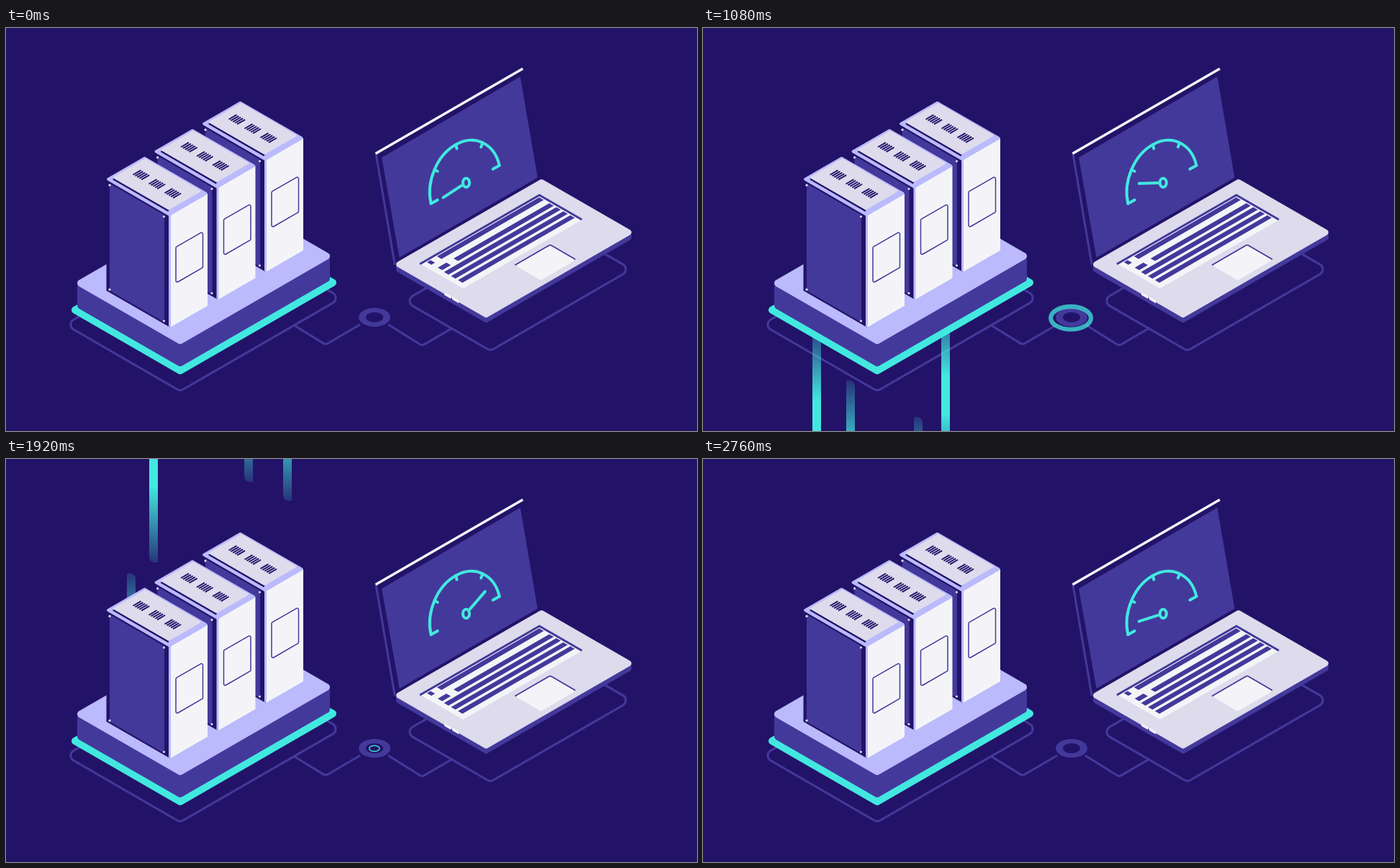
These frames come from a looping animation (960 by 560 pixels, 2.88 s). An HTML page with a canvas:

```html
<!DOCTYPE html>
<html lang="en">
<head>
<meta charset="utf-8">
<title>Server to laptop</title>
<style>
  html, body { margin: 0; width: 100%; height: 100%; overflow: hidden; background: #231368; }
  canvas { display: block; }
</style>
</head>
<body>
<canvas id="stage" width="960" height="560"></canvas>
<script>
const ctx = document.getElementById('stage').getContext('2d');
const LOOP = 2880, STEP = 120;
const ISO = Math.tan(Math.PI / 6);
const NAVY = '#231368', PURPLE = '#43399b', LAVENDER = '#babafc',
      GREY = '#dedbec', WHITE = '#f4f4f8', TEAL = '#42e8e0';

function fill(color) {
  ctx.fillStyle = color;
  ctx.fill();
}

function stroke(color, width, cap = 'butt') {
  ctx.strokeStyle = color;
  ctx.lineWidth = width;
  ctx.lineCap = cap;
  ctx.stroke();
}

// Closed path through [x, y] points with rounded corners.
function trace(points, r = 0) {
  const last = points[points.length - 1];
  ctx.beginPath();
  ctx.moveTo((points[0][0] + last[0]) / 2, (points[0][1] + last[1]) / 2);
  points.forEach((p, i) => ctx.arcTo(...p, ...points[(i + 1) % points.length], r));
  ctx.closePath();
}

function traceLine(points, r = 0) {
  ctx.beginPath();
  ctx.moveTo(...points[0]);
  for (let i = 1; i < points.length - 1; i++) ctx.arcTo(...points[i], ...points[i + 1], r);
  ctx.lineTo(...points[points.length - 1]);
}

function traceOval(x, y, rx, ry) {
  ctx.beginPath();
  ctx.ellipse(x, y, rx, ry, 0, 0, 2 * Math.PI);
}

// Isometric floor tile: its bottom corner and its reach to the left and right.
function traceTile(x, y, left, right, r = 0) {
  trace([[x, y], [x - left, y - left * ISO],
         [x + right - left, y - (left + right) * ISO],
         [x + right, y - right * ISO]], r);
}

function tile(color, ...shape) {
  traceTile(...shape);
  fill(color);
}

// Isometric upright face, going up and away from its near top corner.
function traceWall(x, y, dx, height, r = 0) {
  const far = y - Math.abs(dx) * ISO;
  trace([[x, y], [x + dx, far], [x + dx, far + height], [x, y + height]], r);
}

function wall(color, ...shape) {
  traceWall(...shape);
  fill(color);
}

function slab(top, side, x, y, left, right, height, r) {
  const l = left - r, m = right - r;
  trace([[x - l, y - left * ISO], [x - l, y + height - l * ISO], [x, y + height],
         [x + m, y + height - m * ISO], [x + m, y - right * ISO]], r);
  fill(side);
  tile(top, x, y, left, right, r);
}

function drawCables() {
  traceTile(242, 504.5, 160, 224, 8);
  stroke(PURPLE, 3);
  traceTile(673, 448.5, 120, 196, 8);
  stroke(PURPLE, 3);
  traceLine([[400, 413], [444, 440], [492, 412]], 6);
  stroke(PURPLE, 3);
  traceLine([[531, 412], [578, 441.5], [620, 417]], 6);
  stroke(PURPLE, 3);
  traceOval(512, 402, 22, 13);
  fill(PURPLE);
  traceOval(512, 402, 12, 7);
  fill(NAVY);
}

function drawBeam(x, top, length) {
  const fade = ctx.createLinearGradient(0, top, 0, top + length);
  const dim = 'rgba(66,232,224,0.15)';
  fade.addColorStop(0, dim);
  fade.addColorStop(0.4, TEAL);
  fade.addColorStop(0.6, TEAL);
  fade.addColorStop(1, dim);
  ctx.beginPath();
  ctx.roundRect(x - 6, top, 12, length, [2, 8, 2, 8]);
  fill(fade);
}

// Each lane is [x, time its beam enters]; falling lanes fire twice per loop.
const falling = [[174, 140], [205, 394], [337, 496]];
const rising = [[158, 946], [299, 1062], [391, 1223]];
const BEAM_SPEED = 1.1, BEAM_LENGTH = 265, REFIRE = 1395;

function drawBeams(t) {
  for (const [x, start] of falling) {
    for (const fired of [start, start + REFIRE]) {
      drawBeam(x, BEAM_SPEED * (t - fired) - BEAM_LENGTH, BEAM_LENGTH);
    }
  }
  for (const [x, start] of rising) drawBeam(x, 560 - BEAM_SPEED * (t - start), BEAM_LENGTH);
}

const ripples = [
  { x: 752, y: 209, starts: [211, 2135] },
  { x: 117, y: 331, starts: [314, 2208] },
  { x: 512, y: 402, starts: [962, 1890] },
  { x: 447, y: 338, starts: [1375] }
];

function drawRipples(t) {
  for (const { x, y, starts } of ripples) {
    for (const start of starts) {
      const r = (t - start) * 0.2625;
      if (r <= 0 || r >= 120) continue;
      ctx.globalAlpha = 1 - r / 120;
      traceOval(x - r * 0.03, y + r * 0.03, r * 0.9, r * 0.51);
      stroke(TEAL, r * 0.2);
    }
  }
  ctx.globalAlpha = 1;
}

function drawPlatform() {
  tile(TEAL, 242, 482, 156, 222, 5);
  slab(LAVENDER, PURPLE, 242, 440, 148, 213, 31, 5);
}

function drawServer(place) {
  ctx.save();
  ctx.translate(place * 66.5, place * -38.5);
  wall(NAVY, 228, 261, -88.5, 155);
  wall(PURPLE, 220, 260, -76, 149);
  wall(WHITE, 228, 260, 52, 156);
  wall(LAVENDER, 226, 259, 3, 157);
  for (const dx of [0, -75.5]) {
    for (const dy of [2, 147]) {
      traceOval(219.5 + dx, 260 + dx * ISO + dy, 1.6, 1.6);
      fill(GREY);
    }
  }
  tile(LAVENDER, 227, 261.5, 89, 54.5, 2);
  traceLine([[149, 209.5], [226, 209.5 + 77 * ISO]]);
  stroke(NAVY, 3);
  tile(GREY, 226, 253, 78.5, 46, 1.5);
  for (let i = 0; i < 15; i++) {
    const along = Math.floor(i / 5) * 22 + (i % 5) * 2.9;
    const x = 176.5 + along, y = 204 + along * ISO;
    traceLine([[x, y], [x + 11, y - 11 * ISO]]);
    stroke(NAVY, 1.9);
  }
  traceWall(236, 304.5, 37.5, 50, 2);
  stroke(PURPLE, 1.5);
  ctx.restore();
}

// A strip of keys, placed by depth across the rows and by reach along them.
function drawKeys(depth, from, to) {
  const x = 591 + depth + from, y = 329 + (depth - from) * ISO;
  tile(PURPLE, x, y, 6.2, to - from);
}

function drawKeyboard() {
  tile(WHITE, 635, 362, 59, 165);
  traceLine([[575, 328], [741, 328 - 166 * ISO], [800, 328 - 107 * ISO]]);
  stroke(PURPLE, 3);
  drawKeys(0, 0, 5);
  drawKeys(0, 14, 156);
  drawKeys(14, 1, 13);
  drawKeys(14, 23, 156);
  for (let row = 0; row < 3; row++) drawKeys(23.7 + row * 9.7, 0, 156);
}

function drawLaptop() {
  trace([[513, 174], [721, 56], [747, 213], [541, 330]]);
  fill(NAVY);
  traceLine([[514, 175], [540, 328]]);
  stroke(PURPLE, 3, 'round');
  traceLine([[513.5, 174.5], [718, 56.5]]);
  stroke(WHITE, 3.6);
  trace([[522, 180], [714.5, 67.5], [738.5, 208], [546.5, 319]], 1);
  fill(PURPLE);
  slab(GREY, PURPLE, 667, 403, 129, 206, 7, 4);
  for (const x of [618, 629]) wall(WHITE, x, 378.5 + (x - 629) * ISO, -9, 4);
  drawKeyboard();
  tile(WHITE, 743, 350.5, 36, 49, 3);
  traceLine([[707, 329.5], [756, 329.5 - 49 * ISO], [791, 329.5 - 14 * ISO]], 3);
  stroke(PURPLE, 1.8);
}

// Point on the gauge face, which lies in the tilted plane of the screen.
const face = [47.5, -26.5, -13, -55.5, 638, 217.5];

function onGauge(deg, r) {
  const a = deg * Math.PI / 180;
  const { x, y } = new DOMMatrix(face).transformPoint({ x: Math.cos(a) * r, y: Math.sin(a) * r });
  return [x, y];
}

const needleKeys = [[0, 184], [600, 140], [1080, 156], [1680, 27],
                    [1920, 22], [2280, 29], [LOOP, 184]];

function needleAngle(t) {
  const i = needleKeys.findIndex(k => k[0] > t);
  const [t0, a0] = needleKeys[i - 1], [t1, a1] = needleKeys[i];
  const ease = (1 - Math.cos(Math.PI * (t - t0) / (t1 - t0))) / 2;
  return a0 + (a1 - a0) * ease;
}

function drawGauge(t) {
  ctx.save();
  ctx.transform(...face);
  ctx.beginPath();
  ctx.arc(0, 0, 1, 0, Math.PI);
  ctx.restore();
  stroke(TEAL, 4, 'round');
  for (let deg = 0; deg <= 180; deg += 45) {
    traceLine([onGauge(deg, 1), onGauge(deg, deg % 180 ? 0.9 : 0.81)]);
    stroke(TEAL, 4, 'round');
  }
  ctx.save();
  ctx.translate(1, -2.5);
  const angle = needleAngle(t);
  traceLine([onGauge(angle, 0.14), onGauge(angle, 0.68)]);
  stroke(TEAL, 4, 'round');
  ctx.restore();
  traceOval(639.3, 215, 4.6, 6.2);
  fill(PURPLE);
  stroke(TEAL, 4);
}

function draw(t) {
  ctx.fillStyle = NAVY;
  ctx.fillRect(0, 0, 960, 560);
  drawCables();
  drawBeams(t);
  drawRipples(t);
  drawPlatform();
  for (let place = 2; place >= 0; place--) drawServer(place);
  drawLaptop();
  drawGauge(t);
}

const begin = performance.now();
function tick() {
  const t = (performance.now() - begin) % LOOP;
  draw(Math.floor(t / STEP) * STEP);
  requestAnimationFrame(tick);
}
tick();
</script>
</body>
</html>
```
